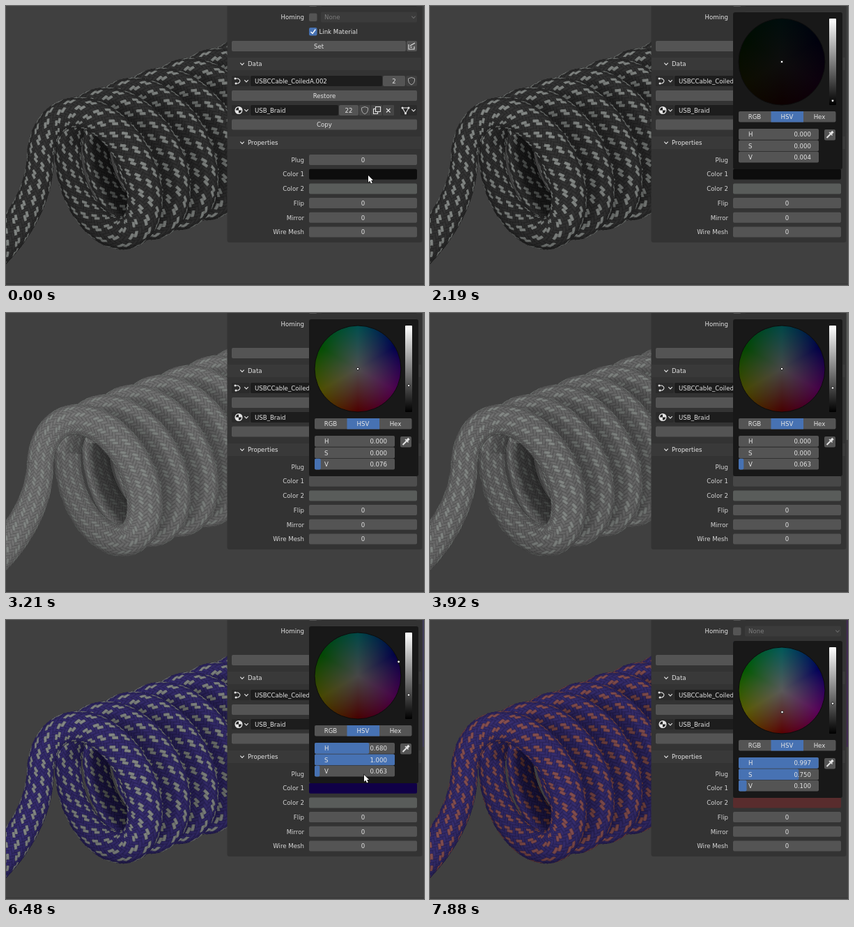
Recreate the animation shown at these times as an HTML page with a canvas. Size 600 px wide and 400 px high, loop 8000 ms.

```html
<!DOCTYPE html>
<html lang="en">
<head>
<meta charset="utf-8">
<title>Braided cable colours</title>
<style>
html, body { margin: 0; width: 100%; height: 100%; overflow: hidden; background: #404040; }
canvas { display: block; width: 600px; height: 400px; }
</style>
</head>
<body>
<canvas id="stage" width="600" height="400"></canvas>
<script>
const ctx = document.getElementById('stage').getContext('2d');
const LOOP = 8000, LEAD = 1190, STEP = 142;
const FONT = '8.6px "DejaVu Sans", sans-serif';
const BLUE = '#4772b3', GREY = '#545454', DARK = '#1d1d1d', SLOT = '#2b2b2b', INK = '#e4e4e4';
const { PI, sin, cos, floor, hypot } = Math;
const clamp = (x, a = 0, b = 1) => Math.min(b, Math.max(a, x));
const mod = (x, n) => ((x % n) + n) % n;
const ramp = (a, b, x) => clamp((x - a) / (b - a));
const smooth = (a, b, x) => { const t = ramp(a, b, x); return t * t * (3 - 2 * t); };

// ---- motion: everything follows the step number n ----
const colorOne = n => ({
  h: n > 19 ? .711 - .031 * ramp(24, 36, n) : 0,
  s: .802 * ramp(19, 23, n) + .198 * ramp(24, 36, n),
  v: .004 + .112 * ramp(7, 10, n) - .053 * ramp(11, 15, n)
});
const colorTwo = n => ({
  h: n < 42 ? .4 : .997,
  s: .07 + .68 * ramp(41, 47, n),
  v: .107 - .007 * ramp(41, 47, n)
});
function pointerAt(n) {
  const glide = (a, b, [x0, y0], [x1, y1]) => {
    const t = ramp(a, b, n);
    return [x0 + (x1 - x0) * t, y0 + (y1 - y0) * t];
  };
  if (n <= 5) return glide(0, 5, [520, 243], [578, 134]);
  if (n >= 16 && n <= 18) return glide(16, 18, [578, 107], [507, 82]);
  if (n >= 36 && n <= 41) return glide(36, 38, [508, 186], [520, 258]);
  return null;
}

// ---- colour ----
const gamma = x => x <= .0031308 ? 12.92 * x : 1.055 * Math.pow(x, 1 / 2.4) - .055;
const linear = ({ h, s, v }) => [5, 3, 1].map(k => {
  const m = (k + h * 6) % 6;
  return v * (1 - s * clamp(Math.min(m, 4 - m)));
});
const css = rgb => `rgb(${rgb.map(c => Math.round(255 * gamma(clamp(c)))).join()})`;
const lit = (c, m) => (c * 1.95 + .026) * m;

// ---- cable: a straightening tail, then a slanted helix ----
const TURNS = 7, SCALE = 2;
const CW = 320 * SCALE, CH = 380 * SCALE;
const cable = document.createElement('canvas');
cable.width = CW;
cable.height = CH;
const cableCtx = cable.getContext('2d');
const image = cableCtx.createImageData(CW, CH);
const kind = new Uint8Array(CW * CH), shade = new Uint8Array(CW * CH);

function centre(a) {
  if (a < 0) {
    const d = -87 * a;
    return { x: 49 - .0034 * d * d, y: 215 + d, r: Math.min(23, 19 + .035 * d) };
  }
  const turn = a / (2 * PI);
  return {
    x: 114 - 65 * cos(a) + 40 * turn,
    y: 245.5 - 30.5 * cos(a) - 85 * sin(a) - 14 * turn,
    r: 22.3 - 3.3 * cos(a) + .5 * sin(a)
  };
}

// two-over-two braid: strand colour and its relief
function weave(u, w) {
  const size = 6.1, p = (u + w) / size, q = (u - w) / size;
  const i = floor(p), j = floor(q);
  const over = mod(i - j, 4);
  const onTop = over >= 2;
  const across = onTop ? q - j : p - i;
  const run = onTop ? (p - i + over - 2) / 2 : (q - j + 1 - over) / 2;
  const crown = .52 + .48 * Math.pow(sin(PI * across), .7);
  const ends = .82 + .18 * Math.pow(sin(PI * clamp(run)), .5);
  return { tint: onTop && mod(j, 4) < 2 ? 2 : 1, relief: crown * ends * (onTop ? 1.06 : .98) };
}

function windCable() {
  const path = [];
  let length = 0;
  for (let a = -2.2; a < TURNS * 2 * PI; a += .0026) {
    const p = centre(a), last = path[path.length - 1];
    if (last) length += hypot(p.x - last.x, p.y - last.y);
    path.push({ ...p, u: length, turn: a / (2 * PI) });
  }
  // far end first, so nearer turns cover it
  for (let i = path.length - 2; i > 0; i--) {
    const s = path[i], a = path[i - 1], b = path[i + 1];
    const len = hypot(b.x - a.x, b.y - a.y);
    const nx = (b.y - a.y) / len, ny = (a.x - b.x) / len;
    const k = floor(s.turn), inside = smooth(.55, .75, s.turn - k);
    for (let v = -1; v <= 1; v += .34 / s.r) {
      const px = floor((s.x + nx * s.r * v) * SCALE), py = floor((s.y + ny * s.r * v) * SCALE);
      if (px < 0 || py < 0 || px >= CW || py >= CH) continue;
      const { tint, relief } = weave(s.u, 23 * Math.asin(v));
      let m = (.42 + .6 * Math.pow(1 - v * v, .4)) * (1 - .16 * ny * v) * relief;
      if (k > 0) m *= (.55 + .45 * smooth(-.3, .7, v)) * (1 - .55 * inside * (1 - smooth(.2, .8, v)));
      else if (k === 0) m *= 1 - .2 * inside;
      kind[py * CW + px] = tint;
      shade[py * CW + px] = clamp(m * 200, 0, 255);
    }
  }
}

function dyeCable(c1, c2) {
  const tables = [c1, c2].map(c => c.map(ch =>
    Uint8Array.from({ length: 256 }, (_, m) => 255 * gamma(clamp(lit(ch, m / 200))))));
  const d = image.data;
  kind.forEach((k, i) => {
    if (!k) return;
    const [r, g, b] = tables[k - 1], m = shade[i], o = i * 4;
    d[o] = r[m];
    d[o + 1] = g[m];
    d[o + 2] = b[m];
    d[o + 3] = 255;
  });
  cableCtx.putImageData(image, 0, 0);
}

// ---- drawing helpers ----
function box(x, y, w, h, fill, r = 2) {
  ctx.fillStyle = fill;
  ctx.beginPath();
  ctx.roundRect(x, y, w, h, r);
  ctx.fill();
}
function text(str, x, y, align = 'left', fill = INK) {
  ctx.font = FONT;
  ctx.textAlign = align;
  ctx.fillStyle = fill;
  ctx.fillText(str, x, y + 3.2);
}
function stroke(d, color = INK, width = 1.1) {
  ctx.strokeStyle = color;
  ctx.lineWidth = width;
  ctx.stroke(new Path2D(d));
}
function dot(x, y, r, fill, rim) {
  ctx.beginPath();
  ctx.arc(x, y, r, 0, 7);
  ctx.fillStyle = fill;
  ctx.fill();
  if (!rim) return;
  ctx.strokeStyle = rim;
  ctx.lineWidth = 1;
  ctx.stroke();
}
const chevron = (x, y, color) => stroke(`M${x - 2.7} ${y - 1.4}l2.7 2.8l2.7-2.8`, color);
const shield = (x, y) => stroke(`M${x} ${y - 5}l4.5 1.5v3q0 4-4.5 6q-4.5-2-4.5-6v-3z`, '#a8a8a8', 1);
function button(label, y, x = 324, w = 266) {
  box(x, y - 7.5, w, 15, GREY);
  text(label, x + w / 2, y, 'center');
}
function slot(label, y, w) {
  box(324, y - 7.5, 26, 15, SLOT);
  chevron(345, y);
  box(351, y - 7.5, w, 15, DARK);
  text(label, 357, y);
}
function header(label, y) {
  box(318, y - 9, 278, 18, '#393939', 0);
  chevron(339, y);
  text(label, 347, y);
}

function drawPanel(c1, c2) {
  box(317.5, -6, 280, 345, '#333333', 3);
  box(435, -10, 11.5, 11, GREY);
  box(452, -10, 138, 11, SLOT);
  text('Homing', 428, 16, 'right');
  box(435, 10.5, 11.5, 11.5, GREY);
  box(452, 8.5, 138, 15, '#3b3b3b');
  text('None', 457, 16, 'left', '#7c7c7c');
  chevron(585, 16, '#666');
  box(435, 31, 11.5, 11.5, BLUE);
  stroke('M437.5 37l2.5 2.5l4.3-6', '#fff', 1.4);
  text('Link Material', 449.5, 37);
  button('Set', 57.5, 324, 250);
  box(575, 50, 15, 15, GREY);
  stroke('M578 55v7h8v-4M580 59h3M580 57l7-4');

  header('Data', 83);
  slot('USBCCable_CoiledA.002', 107.5, 189);
  stroke('M329 104h4q6 3.500 0 7h-3');
  dot(329, 104, 1.5, INK);
  dot(330, 111, 1.5, INK);
  button('2', 107.5, 541, 32);
  box(574, 100, 16, 15, '#3f3f3f');
  shield(582, 107.5);
  button('Restore', 128.5);

  slot('USB_Braid', 149.5, 126);
  dot(334, 149.5, 5.5, INK);
  box(334, 149.5, 4, 4, '#222', [0, 0, 4, 0]);
  box(330, 145.5, 4, 4, '#222', [4, 0, 0, 0]);
  button('22', 149.5, 478, 28);
  for (let x = 507; x < 550; x += 17) box(x, 142, 16, 15, '#454545', 1);
  shield(515, 149.5);
  stroke('M530.5 147.500h-3v7h6v-3M530.5 144.500h7v7h-7z');
  stroke('M546 147l5.500 5.500m0-5.500l-5.500 5.500');
  box(566, 142, 24, 15, SLOT);
  stroke('M569 146h9l-4.500 8z');
  dot(569, 146, 1.5, INK);
  dot(578, 146, 1.5, INK);
  dot(573.5, 154, 1.5, INK);
  chevron(585, 149.5);
  button('Copy', 170);

  header('Properties', 196);
  ['Plug', 'Color 1', 'Color 2', 'Flip', 'Mirror', 'Wire Mesh'].forEach((label, i) => {
    const y = 220.5 + i * 20.7;
    text(label, 428, y, 'right', '#d6d6d6');
    if (i === 1 || i === 2) box(435, y - 7.5, 155, 15, css(i === 1 ? c1 : c2));
    else button('0', y, 435, 155);
  });
}

function drawWheel(x, y, { h, s, v }) {
  const R = 62;
  const hue = ctx.createConicGradient(PI / 2, x, y);
  for (let i = 0; i <= 6; i++) hue.addColorStop(i / 6, css(linear({ h: i / 6 % 1, s: 1, v })));
  dot(x, y, R, hue);
  const g = Math.round(255 * gamma(v));
  const fade = ctx.createRadialGradient(x, y, 0, x, y, R);
  fade.addColorStop(0, `rgb(${g},${g},${g})`);
  fade.addColorStop(1, `rgba(${g},${g},${g},0)`);
  dot(x, y, R, fade, '#0c0c0c');
  const a = 2 * PI * h - .12 * sin(2 * PI * h), r = R * (1 - Math.sqrt(1 - s));
  dot(x - sin(a) * r, y + cos(a) * r, 1.8, '#fff', '#222');
}

function drawPicker(top, color) {
  ctx.save();
  ctx.translate(0, top);
  box(435, 0, 157, 225, '#181818', 3);
  drawWheel(505, 71, color);

  const scale = ctx.createLinearGradient(0, 9, 0, 133);
  scale.addColorStop(0, '#fff');
  scale.addColorStop(1, '#000');
  box(573, 9, 10, 124, scale, 1);
  dot(578, 133 - 124 * gamma(color.v), 1.8, '#fff', '#222');

  box(443, 142, 139.5, 15.5, GREY);
  box(489.5, 142, 46.5, 15.5, BLUE, 0);
  ['RGB', 'HSV', 'Hex'].forEach((label, i) => text(label, 466 + i * 46.5, 149.7, 'center'));

  ['h', 's', 'v'].forEach((key, i) => {
    const y = 167 + i * 16.4, value = color[key];
    box(443, y, 115, 15.8, GREY);
    if (value > .01) box(443, y, 115 * value, 15.8, BLUE);
    text(key.toUpperCase(), 457, y + 8);
    text(value.toFixed(3), 547, y + 8, 'right');
  });
  box(566, 168, 16, 15.5, GREY);
  stroke('M569.5 180l5.500-5.500', INK, 2);
  stroke('M573 172l4.500 4.500', INK, 1.4);
  stroke('M575.5 174l3-3', INK, 3.2);
  ctx.restore();
}

function drawPointer([x, y]) {
  ctx.save();
  ctx.translate(x, y);
  ctx.scale(.88, .88);
  const arrow = 'M0 0V11L2.6 8.7L4.6 13L6.6 12L4.6 8H8Z';
  stroke(arrow, '#111', 1.4);
  ctx.fillStyle = '#fff';
  ctx.fill(new Path2D(arrow));
  ctx.restore();
}

function draw(n) {
  const hsv1 = colorOne(n), hsv2 = colorTwo(n), pointer = pointerAt(n);
  const c1 = linear(hsv1), c2 = linear(hsv2);
  box(0, 0, 600, 400, '#404040', 0);
  box(0, 398, 600, 1, '#383838', 0);
  dyeCable(c1, c2);
  ctx.imageSmoothingQuality = 'high';
  ctx.drawImage(cable, 0, 0, CW / SCALE, CH / SCALE);
  box(597.5, 0, 2.5, 182, css(c1.map((c, i) => lit(.75 * c + .25 * c2[i], .6))), 0);
  drawPanel(c1, c2);
  if (n >= 0 && n <= 37) drawPicker(9, hsv1);
  if (n >= 40) drawPicker(30, hsv2);
  if (pointer) drawPointer(pointer);
}

windCable();
let shown = null;
const start = performance.now();
function tick(now) {
  const t = Math.max(0, now - start) % LOOP;
  const n = Math.max(-1, floor((t - LEAD) / STEP));
  if (n !== shown) draw(shown = n);
  requestAnimationFrame(tick);
}
tick(start);
</script>
</body>
</html>
```
